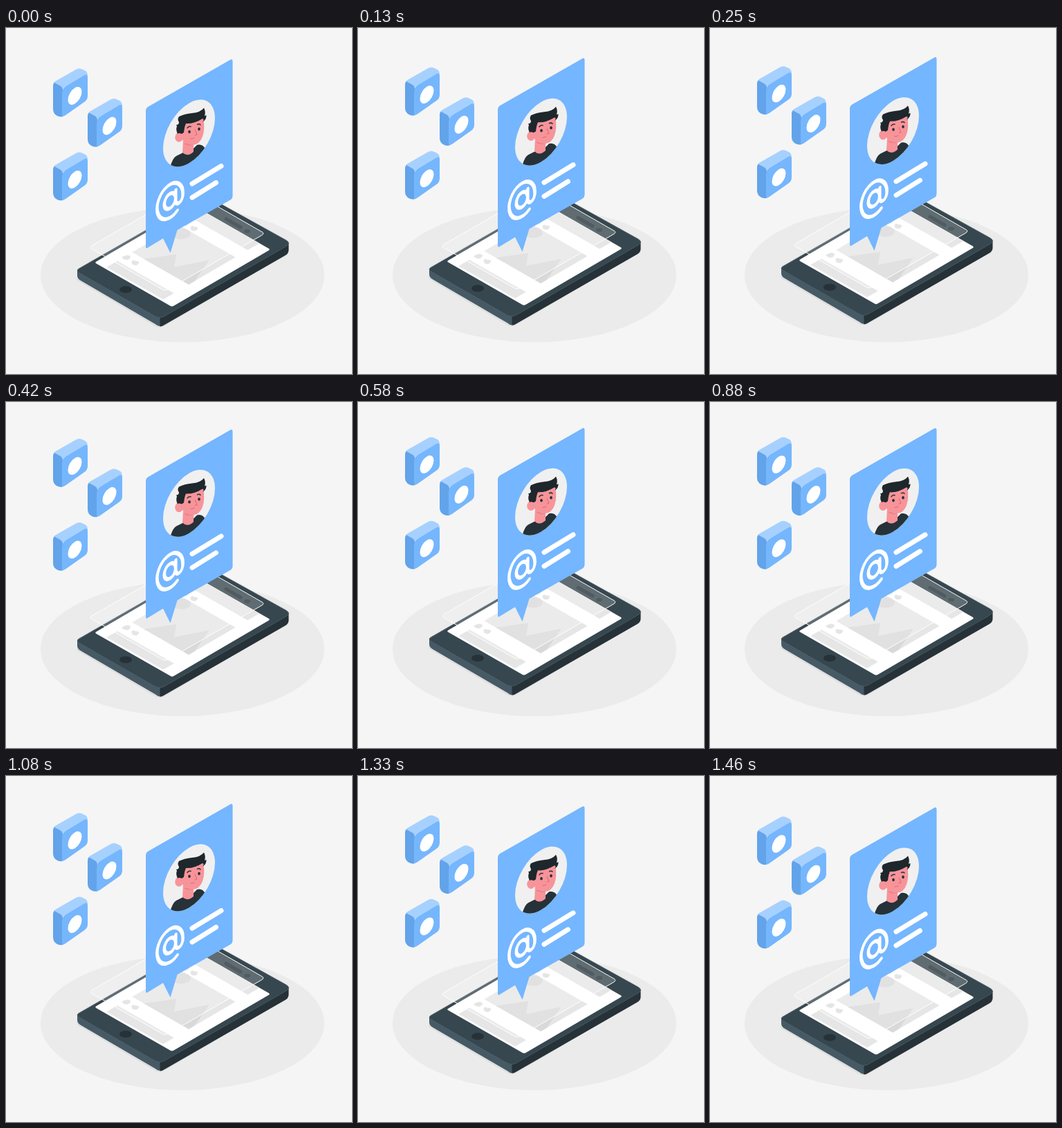
Recreate the animation shown at these times as an HTML page. Size 500 px wide and 500 px high, loop 1.5 s.

```html
<!DOCTYPE html>
<html lang="en">
<head>
<meta charset="utf-8">
<title>Floating profile card</title>
<style>
  html, body { margin: 0; height: 100%; overflow: hidden; background: #f5f5f5; }
  svg { display: block; width: 100vw; height: 100vh; }
</style>
</head>
<body>
<svg viewBox="0 0 500 500">
  <defs>
    <g id="tile">
      <path fill="#a6d1ff" d="M69 80 Q69 78 73 76 L101 60 Q106 57 111 60 L115 62 Q118 64 118 70 L81 91Z"/>
      <path fill="#62a3ea" d="M68 84 Q68 80 70 79 L79 84 Q82 86 82 91 V128 Q78 129 74 127 Q68 124 68 117Z"/>
      <path fill="#75b6fd" d="M81 95 Q81 88 87 84 L112 69 Q118 65 118 72 V98 Q118 104 113 107 L86 126 Q83 128 81 128Z"/>
      <circle r="11.5" fill="#fff" transform="matrix(.866 -.5 0 1 99.5 98)"/>
    </g>
    <clipPath id="portrait"><circle r="43.3" transform="matrix(.866 -.5 0 1 264.5 152)"/></clipPath>
  </defs>

  <ellipse cx="255" cy="357" rx="205" ry="97" fill="#ebebeb"/>

  <g id="scene">
    <!-- phone -->
    <path fill="#dedede" d="M102 361 Q102 365 107 367 L216 431 Q222 434 228 431 L300 389 L222 420Z"/>
    <path fill="#455a64" d="M103 350 V358 Q103 362 108 365 L216 428 Q219 431 223 431 V415Z"/>
    <path fill="#263238" d="M222.500 415 V431.500 Q226 431 229 429 L403 329 Q408.500 326 408.500 321 V310Z"/>
    <path fill="#37474f" stroke="#5b6e78" stroke-width=".5" d="M108 355 Q98 350.500 108 346 L284 245 Q289 242 294 245 L404 306 Q413 311 404 316 L228 417 Q222 420 216 417Z"/>
    <ellipse cx="173" cy="378" rx="9" ry="5" fill="#263238"/>
    <path stroke="#263238" stroke-width="5" stroke-linecap="round" d="M318 276 L339 288"/>
    <ellipse cx="348.500" cy="293.500" rx="4.500" ry="2.800" fill="#263238"/>

    <!-- screen -->
    <g transform="matrix(1.12 .64 1.42 -.83 128 339)" fill="#e6e6e6">
      <rect width="100" height="100" rx="2" fill="#fff"/>
      <rect x="13" y="2" width="73" height="11"/>
      <rect x="13" y="28" width="73" height="47.500"/>
      <rect x="13" y="88" width="73" height="12"/>
      <g fill="#d9d9d9">
        <path d="M28 28 L44 48.500 L57 36 L72 60 L86 34 V28Z"/>
        <ellipse cx="24.500" cy="69" rx="8.500" ry="6.700"/>
      </g>
    </g>
    <g fill="#dedede">
      <path id="heart" d="M183 342 Q180 337 183 336 Q186 335 187 337 Q192 336 192 339 Q192 341 188 343Z"/>
      <use href="#heart" x="85" y="-49.500"/>
      <path id="chat" d="M168 333 Q167 330 172 329 Q177 327 180 330 Q180 333 176 335 L173 335Z"/>
      <use href="#chat" x="85" y="-49.500"/>
    </g>

    <!-- glass sheet -->
    <rect width="100" height="100" rx="3" transform="matrix(1.1 .63 1.44 -.83 120 317)"
      fill="#fff" fill-opacity=".2" stroke="#fff" vector-effect="non-scaling-stroke"/>

    <!-- card -->
    <path fill="#74b6ff" d="M202 120 Q202 116 205 114 L324 46 Q327.500 44 327.500 48 V243 Q327.500 246 325 248 L247.500 292 L237.500 325 L227 304 L204 318 Q202 319 202 316Z"/>
    <g clip-path="url(#portrait)">
      <path fill="#f0f0f0" d="M220 95h90v115h-90z"/>
      <path fill="#263238" d="M236 206 Q240 188 246 185 L256 180 Q264 187 271 174 L276 169 Q284 167 288 175 L292 206Z"/>
      <path fill="#f7949a" d="M256 162 L255 180 Q262 187 271 179 L271 165Z"/>
      <path fill="#e87983" d="M257 167 Q264 171 271 169 V166Z"/>
      <ellipse cx="250" cy="158" rx="5.800" ry="6.800" fill="#f7949a"/>
      <path fill="#f7949a" d="M253 138 L285 130 Q288 146 284 157 Q280 168 270 169 Q259 169 254 160Z"/>
      <path fill="#1d272c" d="M246 140 Q250 140 250 136 Q247 132 250 128 Q258 124 269 123 Q281 122 286 115.500 Q289 121 287 127 L289.500 126 Q290 132 284 136 Q287 132 284 131 Q271 139 260 138 Q258 142 257 151 L254 153 Q249 151 248 153 Q245 147 247 142Z"/>
      <g fill="#263238">
        <ellipse cx="265" cy="150" rx="1.800" ry="2.200"/>
        <ellipse cx="279" cy="146" rx="1.800" ry="2.200"/>
      </g>
      <g fill="none" stroke="#263238" stroke-width="1.500" stroke-linecap="round">
        <path d="M262 144.500 Q264 141.500 267 142.500 M276.500 139.500 Q279 138 281 140"/>
        <path stroke="#dc6570" stroke-width="1" d="M273 147 L276 154 L273 155 M267 160 Q270 160 272 159"/>
      </g>
    </g>
    <g fill="none" stroke="#fff" stroke-linecap="round">
      <path transform="matrix(.866 -.5 0 1 237 250)" stroke-width="5.300" d="M9.500 0 A9.500 10.500 0 1 1 -9.500 0 A9.500 10.500 0 1 1 9.500 0 M9.500 -11 V4 C9.500 13 21.500 13 21.500 0 A21.500 24 0 1 0 12 20"/>
      <path stroke-width="7" d="M269 225 L311 199.500 M269 245 L303.500 223.500"/>
    </g>

    <use href="#tile"/>
    <use href="#tile" x="50" y="43.500"/>
    <use href="#tile" y="121"/>
  </g>
</svg>
<script>
  const PERIOD = 1500, LIFT = 10, LEAD = 21;
  const scene = document.getElementById('scene');

  // Linear rise and fall
  function draw() {
    const phase = ((performance.now() + LEAD) % PERIOD) / PERIOD;
    const y = 0.28 - LIFT * (1 - Math.abs(1 - 2 * phase));
    scene.setAttribute('transform', `translate(0 ${y.toFixed(3)})`);
    requestAnimationFrame(draw);
  }
  draw();
</script>
</body>
</html>
```
